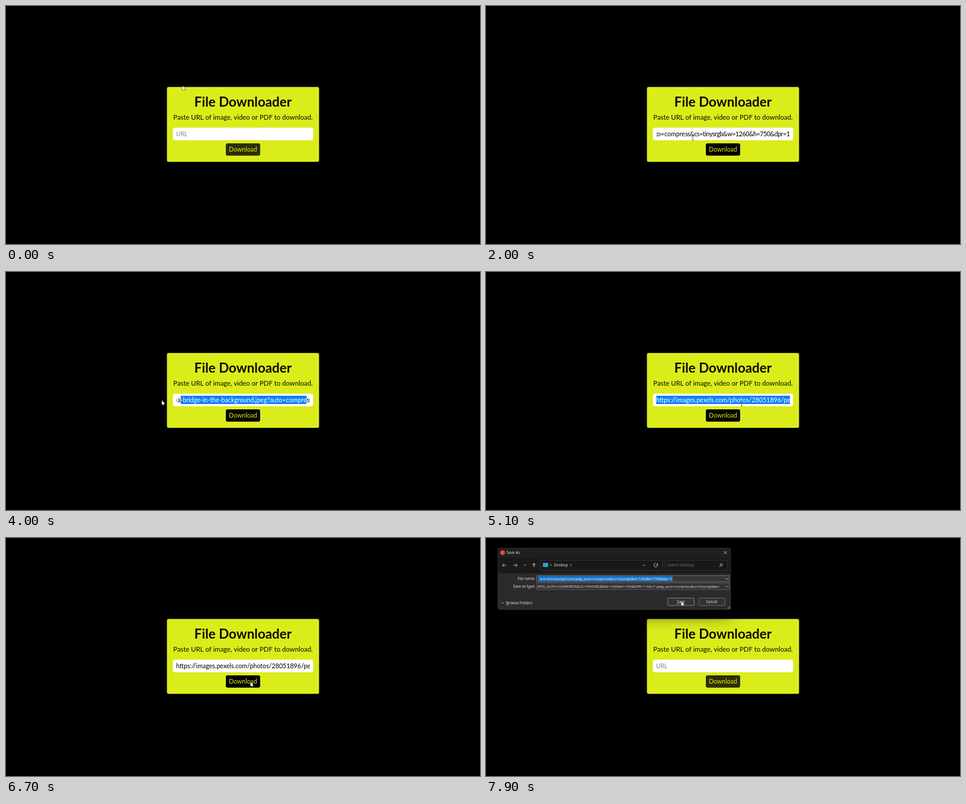
Write an HTML page with a canvas that moves like this. It is 800 px wide and 402 px high and loops after 8000 ms.

```html
<!DOCTYPE html>
<html lang="en">
<head>
<meta charset="utf-8">
<title>File Downloader</title>
<style>
html, body { margin: 0; width: 100%; height: 100%; overflow: hidden; background: #000; }
canvas { display: block; }
</style>
</head>
<body>
<canvas id="stage" width="800" height="402"></canvas>
<script>
const ctx = document.getElementById('stage').getContext('2d');
const LOOP = 8000, STEP = 100;
const LIME = '#dbec1b';
const ROUND = 'Lato, "Open Sans", sans-serif';
const UI = '"Open Sans", "Noto Sans", sans-serif';
const FIELD = { x: 281.7, y: 205.6, w: 236.6, h: 21.2, left: 287, right: 513 };

// The address up to the point where the selection is anchored, and the rest
const HEAD = 'https://images.pexels.com/photos/28051896/pexels-photo-28051896/' +
  'free-photo-of-a-city-with-a-bridge-in-the-background.jpeg?auto=compre';
const TAIL = 'ss&cs=tinysrgb&w=1260&h=750&dpr=1';
const TAIL_SPACING = -0.42;

// Moments when the state switches, in ms
const PASTE = 800, DRAG = 3500, SCROLL = 3740, DESELECT = 5500, CLEAR = 7300, DIALOG = 7600;
const SCROLL_SPEED = 0.66; // px per ms

// Pointer path: time, x, y
const PATH = [
  [0, 298, 135], [600, 345, 218], [900, 349, 223], [3300, 349, 223],
  [3500, 340, 220], [3700, 270, 217], [4000, 263, 217], [4500, 260, 219],
  [4600, 290, 221], [5100, 431.5, 222.5], [5500, 465, 238], [6000, 470.5, 244.5],
  [6400, 470.5, 244.5], [6800, 402, 243], [7200, 400, 243], [7400, 329.5, 107], [8000, 329.5, 107]
];

function pointerAt(t) {
  let i = 1;
  while (i < PATH.length - 1 && PATH[i][0] < t) i++;
  const [t0, x0, y0] = PATH[i - 1], [t1, x1, y1] = PATH[i];
  const u = Math.min(1, (t - t0) / (t1 - t0)), e = u * u * (3 - 2 * u);
  return { x: x0 + (x1 - x0) * e, y: y0 + (y1 - y0) * e };
}

function box(x, y, w, h, r, fill, line) {
  ctx.beginPath();
  ctx.roundRect(x, y, w, h, r);
  if (fill) { ctx.fillStyle = fill; ctx.fill(); }
  if (line) { ctx.strokeStyle = line; ctx.lineWidth = 0.8; ctx.stroke(); }
}

function text(str, x, y, font, color, align = 'left', spacing = 0) {
  ctx.font = font;
  ctx.fillStyle = color;
  ctx.textAlign = align;
  ctx.letterSpacing = spacing + 'px';
  ctx.fillText(str, x, y);
  ctx.letterSpacing = '0px';
}

function widthOf(str, font, spacing = 0) {
  ctx.font = font;
  return ctx.measureText(str).width + spacing * str.length;
}

function line(color, width, ...pts) {
  ctx.beginPath();
  pts.forEach(([x, y], i) => i ? ctx.lineTo(x, y) : ctx.moveTo(x, y));
  ctx.strokeStyle = color;
  ctx.lineWidth = width;
  ctx.stroke();
}

function clipped(x, y, w, h, draw) {
  ctx.save();
  ctx.beginPath();
  ctx.rect(x, y, w, h);
  ctx.clip();
  draw();
  ctx.restore();
}

function fieldText(t, mouse) {
  const font = '10.65px ' + ROUND;
  const anchor = widthOf(HEAD, font);
  const total = anchor + widthOf(TAIL, font, TAIL_SPACING);
  const end = total - (FIELD.right - FIELD.left);
  const scroll = Math.max(0, end - Math.max(0, t - SCROLL) * SCROLL_SPEED);
  const x = FIELD.left - scroll;
  const draw = color => {
    text(HEAD, x, 220, font, color);
    text(TAIL, x + anchor, 220, font, color, 'left', TAIL_SPACING);
  };

  clipped(FIELD.left, FIELD.y, FIELD.right - FIELD.left, FIELD.h, () => {
    draw('#000');
    if (t < DRAG || t >= DESELECT) return;
    const from = scroll > 0 ? Math.max(mouse.x, 295) : FIELD.left;
    const to = Math.min(x + anchor, FIELD.right);
    if (to <= from) return;
    clipped(from, 209, to - from, 14, () => {
      ctx.fillStyle = '#0f80f5';
      ctx.fillRect(from, 209, to - from, 14);
      draw('#fff');
    });
  });
}

function card(t, mouse) {
  const filled = t >= PASTE && t < CLEAR;
  box(271.6, 136.7, 256.8, 126.6, 3, LIME);
  text('File Downloader', 400, 170.2, '700 22.4px ' + ROUND, '#0a0b00', 'center');
  text('Paste URL of image, video or PDF to download.', 400, 192, '11.32px ' + ROUND, '#0a0b00', 'center');
  box(FIELD.x, FIELD.y, FIELD.w, FIELD.h, 4, '#fff');
  if (filled) fieldText(t, mouse);
  else text('URL', FIELD.left, 220, '10.2px ' + UI, '#757575');
  box(371, 232, 58, 20.8, 3, filled ? '#000' : '#2c2f05');
  text('Download', 400, 246.2, '10.5px ' + ROUND, LIME, 'center');
}

function chevron(x, y, color = '#ccc', side = false) {
  if (side) line(color, 0.8, [x - 1, y - 2], [x + 1, y], [x - 1, y + 2]);
  else line(color, 0.8, [x - 2, y - 1], [x, y + 1], [x + 2, y - 1]);
}

function arrow(x, y, turn, color) {
  ctx.save();
  ctx.translate(x, y);
  ctx.rotate(turn);
  line(color, 0.9, [3.2, 0], [-3.2, 0]);
  line(color, 0.9, [-0.4, -2.8], [-3.2, 0], [-0.4, 2.8]);
  ctx.restore();
}

function dialog() {
  const small = '6.2px ' + UI, pale = '#e6e6e6';
  ctx.save();
  ctx.shadowColor = 'rgba(0,0,0,.6)';
  ctx.shadowBlur = 26;
  ctx.shadowOffsetY = 10;
  box(20, 17, 393, 104, 3, '#2c2a2b');
  ctx.restore();
  box(20, 17, 393, 43, [3, 3, 0, 0], '#1b1a1b');
  box(20, 17, 393, 16, [3, 3, 0, 0], '#201f20');
  box(20.3, 17.3, 392.4, 103.4, 3, null, '#3c3b3c');

  ctx.beginPath();
  ctx.arc(28, 24.7, 4, 0, 7);
  ctx.fillStyle = '#e04a3a';
  ctx.fill();
  text('Save As', 34.5, 27, '6.4px ' + UI, pale);
  line('#ddd', 0.8, [401.5, 22.2], [406.3, 27]);
  line('#ddd', 0.8, [406.3, 22.2], [401.5, 27]);

  arrow(31, 46, 0, '#ccc');
  arrow(49.5, 46, Math.PI, '#ccc');
  chevron(65.5, 45.5);
  arrow(81, 46, Math.PI / 2, '#eee');
  box(92, 37.5, 206, 17.5, 1, '#191819', '#3d3c3d');
  box(96, 42, 9, 7, 1, '#2a9fd8');
  chevron(109.5, 45.7, '#ccc', true);
  text('Desktop', 114.5, 48, small, pale);
  chevron(143.5, 45.7, '#ccc', true);
  chevron(267, 46);
  ctx.beginPath();
  ctx.arc(286.5, 46, 3, -0.4, 4.9);
  ctx.strokeStyle = '#ccc';
  ctx.lineWidth = 0.9;
  ctx.stroke();
  line('#ccc', 0.9, [289.5, 42.6], [289.5, 45], [287.2, 45]);
  box(302, 37.5, 105.5, 17.5, 1, '#191819', '#3d3c3d');
  text('Search Desktop', 306, 48.2, small, '#777');
  ctx.beginPath();
  ctx.arc(397.2, 45.2, 1.9, 0, 7);
  ctx.strokeStyle = '#ccc';
  ctx.lineWidth = 0.9;
  ctx.stroke();
  line('#ccc', 0.9, [395.8, 46.6], [393.6, 48.8]);

  text('File name:', 83, 71, small, pale, 'right');
  text('Save as type:', 83, 84, small, pale, 'right');
  box(85.5, 63.5, 325, 10.5, 0, '#383738', '#777');
  box(85.5, 76, 325, 11, 0, '#333233', '#656465');
  ctx.fillStyle = '#1677cc';
  ctx.fillRect(88, 64.5, 227, 8.5);
  clipped(88, 63, 314, 11, () =>
    text('e-in-the-background.jpeg_auto=compress&cs=tinysrgb&w=1260&h=750&dpr=1',
      314.5, 70.9, '6.05px ' + UI, '#fff', 'right'));
  clipped(87, 76, 315, 11, () =>
    text('JPEG_AUTO=COMPRESS&CS=TINYSRGB&W=1260&H=750&DPR=1 File (*.jpeg_auto=compress&cs=tinysrgb&w=',
      87, 84, '6px ' + UI, pale));
  chevron(406, 69);
  chevron(406, 81.7);

  chevron(28, 109.5);
  text('Browse Folders', 34, 112, small, pale);
  line(pale, 0.5, [34, 113.2], [38, 113.2]);
  box(307, 101.5, 44.5, 12.5, 1, '#333233', '#999');
  box(359, 101.5, 44.5, 12.5, 1, '#333233', '#777');
  text('Save', 329, 110, small, pale, 'center');
  line(pale, 0.5, [322, 111.2], [326, 111.2]);
  text('Cancel', 381, 110, small, pale, 'center');
  ctx.fillStyle = '#aaa';
  for (let i = 0; i < 3; i++)
    for (let j = 0; j <= i; j++) ctx.fillRect(410.6 - j * 1.7, 115 + i * 1.7, 1, 1);
}

function pointer({ x, y }) {
  const inField = x > FIELD.x && x < FIELD.x + FIELD.w && y > FIELD.y && y < FIELD.y + FIELD.h;
  ctx.save();
  ctx.translate(x, y);
  if (inField) {
    line('#555', 0.9, [0, -3.8], [0, 3.8]);
    line('#555', 0.7, [-1.4, -3.8], [1.4, -3.8]);
    line('#555', 0.7, [-1.4, 3.8], [1.4, 3.8]);
  } else {
    ctx.beginPath();
    [[0, 0], [0, 7.4], [1.7, 6], [2.7, 8], [3.7, 7.5], [2.9, 5.6], [5.2, 5.3]]
      .forEach(p => ctx.lineTo(...p));
    ctx.closePath();
    ctx.strokeStyle = '#222';
    ctx.lineWidth = 1;
    ctx.stroke();
    ctx.fillStyle = '#fff';
    ctx.fill();
  }
  ctx.restore();
}

function render(t) {
  const mouse = pointerAt(t);
  ctx.fillStyle = '#000';
  ctx.fillRect(0, 0, 800, 402);
  card(t, mouse);
  if (t >= DIALOG) dialog();
  pointer(mouse);
}

const start = performance.now();
function tick() {
  const t = (performance.now() - start) % LOOP;
  render(Math.floor(t / STEP) * STEP);
  requestAnimationFrame(tick);
}
render(0);
requestAnimationFrame(tick);
</script>
</body>
</html>
```
